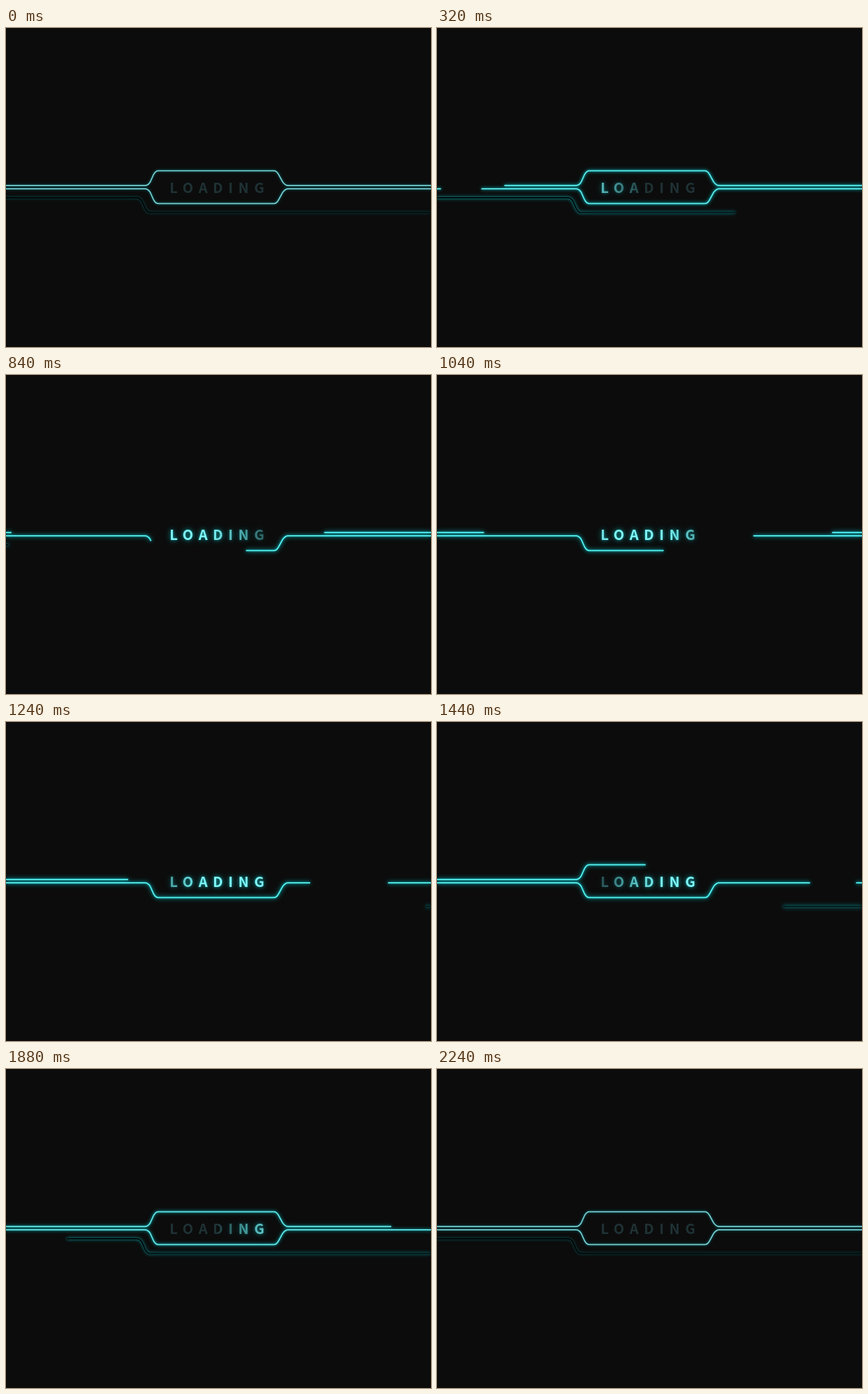
An HTML page for the animation above (2400 ms loop, 619 by 464 pixels).

```html
<!DOCTYPE html>
<html lang="en">
<head>
<meta charset="utf-8">
<title>Loading</title>
<style>
  html, body { margin: 0; height: 100%; overflow: hidden; background: #0c0c0c; }
  svg { display: block; width: 619px; height: 464px; }
  path { fill: none; stroke: currentColor; stroke-width: 1.7; }
  text { font: 700 20.5px "Noto Sans CJK JP", "Noto Sans CJK SC", "Open Sans", sans-serif; letter-spacing: 7.8px; }
  #lit { filter: drop-shadow(0 0 2px #12b5b9a0) drop-shadow(0 0 4px #0aa9ae90); }
</style>
</head>
<body>
<svg viewBox="0 0 619 464">
  <defs>
    <linearGradient id="sweep" gradientUnits="userSpaceOnUse" x1="-226" x2="50">
      <stop offset="0" stop-color="#7ff6f8" stop-opacity="0"/>
      <stop offset=".36" stop-color="#7ff6f8"/>
      <stop offset=".64" stop-color="#7ff6f8"/>
      <stop offset="1" stop-color="#7ff6f8" stop-opacity="0"/>
    </linearGradient>
    <linearGradient id="fade" gradientUnits="userSpaceOnUse" x1="195" x2="225">
      <stop offset="0" stop-color="currentColor"/>
      <stop offset="1" stop-color="currentColor" stop-opacity=".75"/>
    </linearGradient>
  </defs>
  <g id="lines">
    <path id="upper" pathLength="1" d="M0 229.2H202Q207 229.2 210 224L215 213Q218 207.6 222 207.6H390Q394 207.6 397 213L403 224Q407 229.2 411 229.2H619"/>
    <path id="middle" pathLength="1" d="M0 233.9H202Q207 233.9 210 239L215 250Q218 255.4 222 255.4H390Q394 255.4 397 250L403 239Q407 233.9 411 233.9H619"/>
    <path id="lower" pathLength="1" style="stroke:url(#fade)" d="M618 268.4H210Q206 268.4 203 263L198 252Q195 246.9 190 246.9H0"/>
  </g>
  <text x="238.2" y="240" fill="#1f3235">LOADING</text>
  <text x="238.2" y="240" fill="url(#sweep)" id="lit">LOADING</text>
</svg>
<script>
const $ = id => document.getElementById(id);
const LOOP = 2400, END = 2240, STEP = 40;

// Each line is wiped away, then redrawn: [wipe end, redraw start, redraw end] in ms
const timing = {
  upper: [1250, 740, 2155],
  middle: [1555, 226, 1789],
  lower: [880, 1181, 2107]
};

const clamp = v => Math.min(1, Math.max(0, v));
const ease = (t, from, to) => (1 - Math.cos(Math.PI * clamp((t - from) / (to - from)))) / 2;
const mix = (a, b, k) => a.map((v, i) => Math.round(v + (b[i] - v) * k));

function draw(ms) {
  let t = Math.floor(ms % LOOP / STEP) * STEP;
  if (t >= END) t = 0;

  for (const id in timing) {
    const [wiped, from, to] = timing[id];
    const tail = ease(t, 0, wiped), head = Math.min(tail, ease(t, from, to));
    $(id).setAttribute("stroke-dasharray", `${head} ${tail - head} ${1 - tail}`);
  }

  const power = Math.min(clamp(t / 400), clamp((END - t) / 560));
  const glow = `rgba(10,190,195,${0.3 + 0.5 * power})`;
  $("lines").style.color = `rgb(${mix([118, 205, 208], [88, 243, 243], power)})`;
  $("lines").style.filter = `drop-shadow(0 0 1.5px ${glow}) drop-shadow(0 0 ${2 + power}px ${glow})`;
  $("sweep").setAttribute("gradientTransform", `translate(${193 + 0.18 * t} 0)`);
  $("lit").style.visibility = t ? "visible" : "hidden";
}

const start = performance.now();
function frame() {
  draw(performance.now() - start);
  requestAnimationFrame(frame);
}
frame();
</script>
</body>
</html>
```
